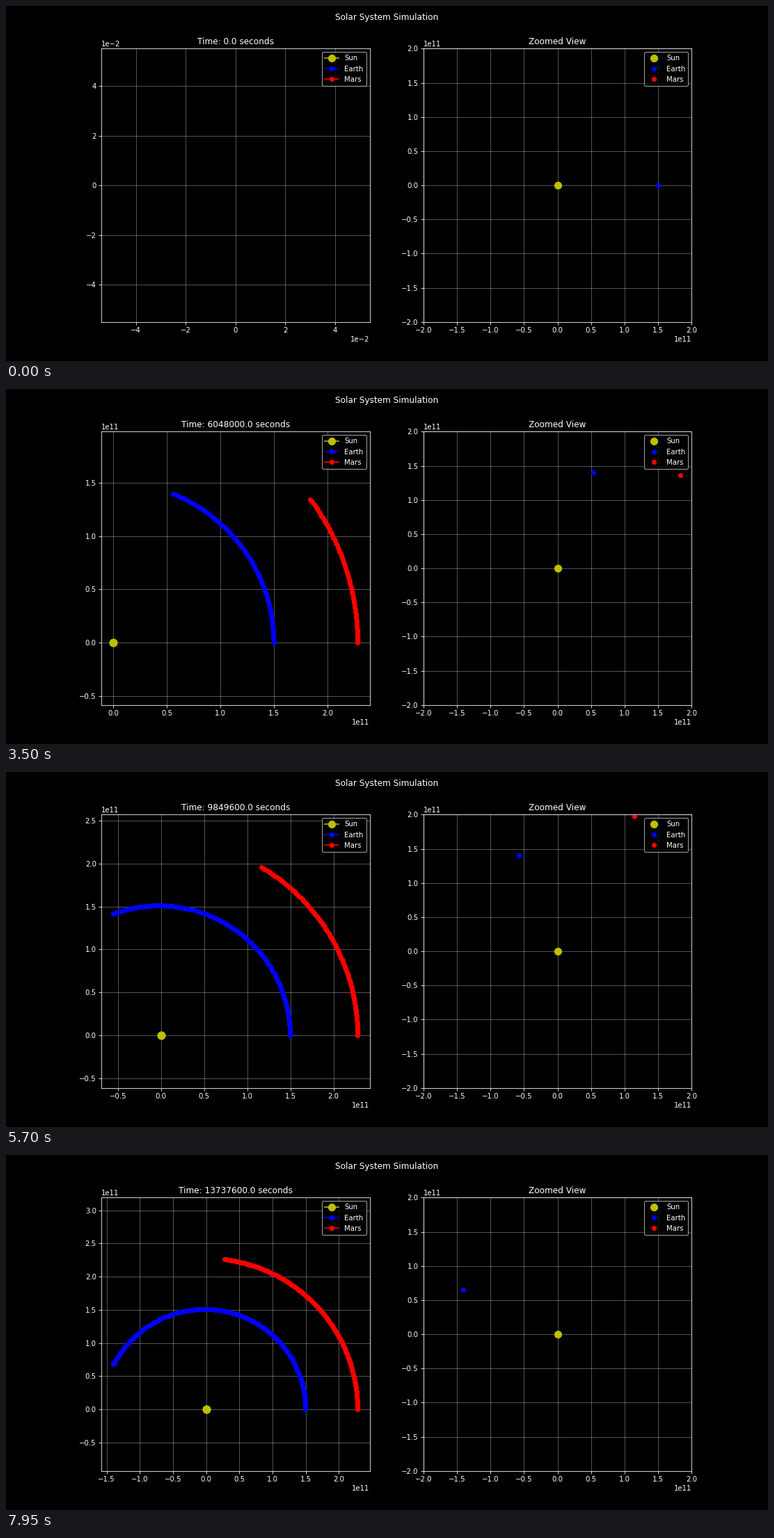
Recreate the animation shown at these times as a matplotlib script. Size 1095 px wide and 511 px high, loop 8000 ms.

```python
import numpy as np
import matplotlib.pyplot as plt
from matplotlib.animation import FuncAnimation

GM = 6.674e-11 * 1.989e30
DAY = 86400.0
FRAMES = 160

# name, colour, marker size, start distance (m), start speed (m/s)
BODIES = [
    ("Sun", "y", 10, 0.0, 0.0),
    ("Earth", "b", 6, 1.496e11, 29783.0),
    ("Mars", "r", 6, 2.279e11, 24077.0),
]


def orbit(dist, speed):
    """Daily positions, with the acceleration held constant over each step."""
    pos, vel = np.array([dist, 0.0]), np.array([0.0, speed])
    path = [pos]
    for _ in range(FRAMES):
        r = np.hypot(*pos)
        acc = -GM * pos / r**3 if r else np.zeros(2)
        pos = pos + vel * DAY + 0.5 * acc * DAY**2
        vel = vel + acc * DAY
        path.append(pos)
    return np.array(path)


plt.style.use("dark_background")
fig, (wide, zoom) = plt.subplots(1, 2, figsize=(15, 7), dpi=73)
fig.suptitle("Solar System Simulation")

paths, trails, dots = [], [], []
for name, color, size, dist, speed in BODIES:
    paths.append(orbit(dist, speed))
    trails += wide.plot([], [], "o-", color=color, markersize=size, label=name)
    dots += zoom.plot([], [], "o", color=color, markersize=size, label=name)

wide.set_aspect("equal", adjustable="datalim")
zoom.set_xlim(-2e11, 2e11)
zoom.set_ylim(-2e11, 2e11)
zoom.set_title("Zoomed View")
for ax in (wide, zoom):
    ax.ticklabel_format(style="sci", axis="both", scilimits=(0, 0))
    ax.grid(True, alpha=0.4)
    ax.legend(loc="best")


def update(day):
    # The trail holds the days already passed; the dot shows the current one.
    for path, trail, dot in zip(paths, trails, dots):
        trail.set_data(path[:day, 0], path[:day, 1])
        dot.set_data(path[day:day + 1, 0], path[day:day + 1, 1])
    wide.relim()
    wide.autoscale_view()
    wide.set_title(f"Time: {day * DAY} seconds")
    return trails + dots


anim = FuncAnimation(fig, update, frames=FRAMES, interval=50,
                     repeat=True, repeat_delay=0, blit=False)
plt.show()
```
